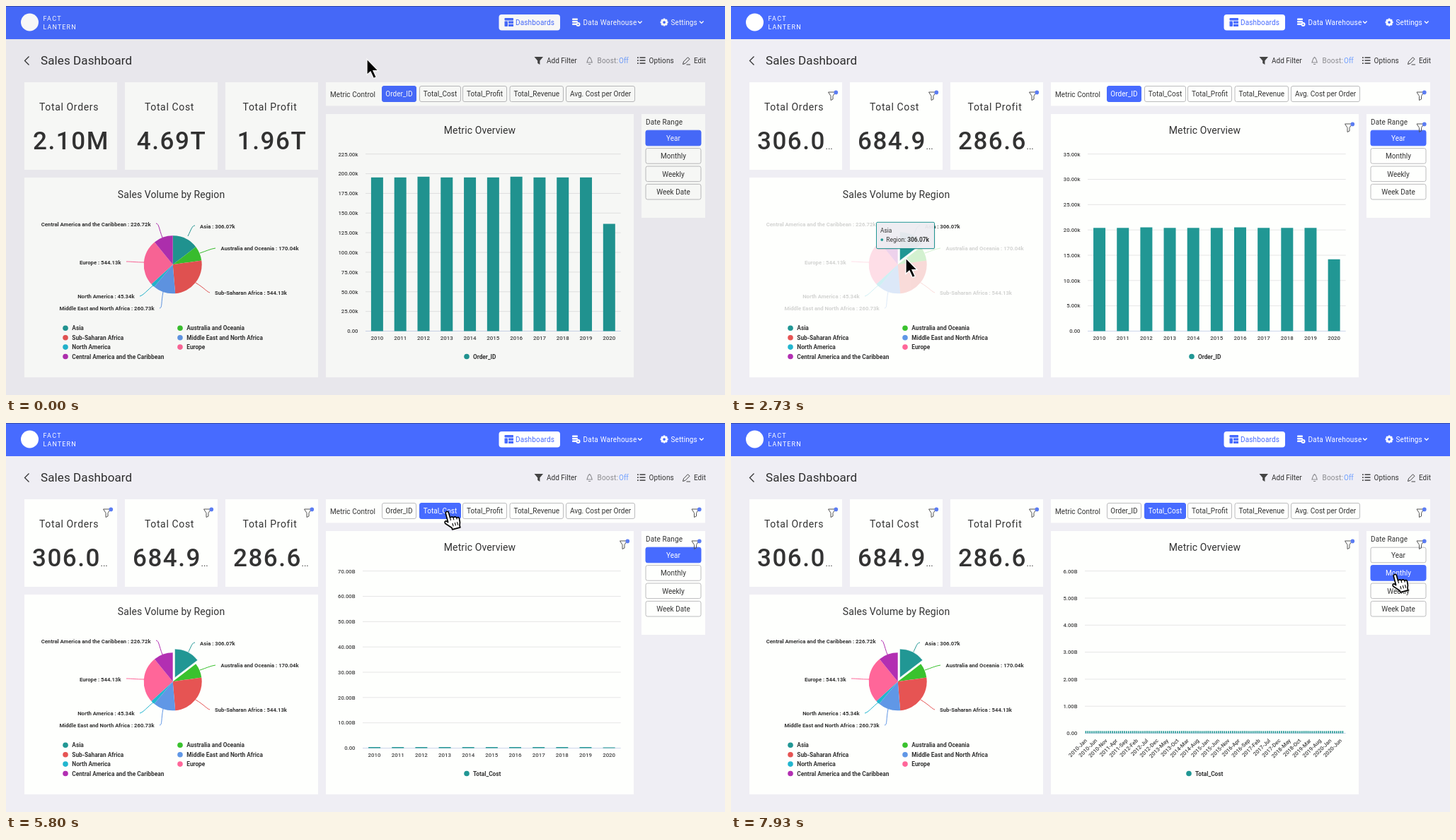
Recreate the animation shown at these times as an HTML page. Size 1016x551 px, loop 8 s.

```html
<!DOCTYPE html>
<html lang="en">
<head>
<meta charset="utf-8">
<title>Sales Dashboard</title>
<style>
html, body { margin: 0; width: 100%; height: 100%; overflow: hidden; background: #efeef4; }
svg { display: block; width: 1016px; height: 551px; font-family: Roboto, sans-serif; }
text { white-space: pre; }
</style>
</head>
<body>
<svg viewBox="0 0 1016 551"><g id="page"></g><g id="live"></g></svg>
<script>
const LOOP = 8000, FPS = 15;
const BLUE = '#476bff', TEAL = '#219794', INK = '#333', CARD = '#fefffd';

// Drawing helpers
const rect = (x, y, w, h, fill, more = '') =>
  `<rect x="${x}" y="${y}" width="${w}" height="${h}" fill="${fill}" ${more}/>`;
const dot = (x, y, r, fill) => `<circle cx="${x}" cy="${y}" r="${r}" fill="${fill}"/>`;
const line = (d, stroke, width = 1, more = '') =>
  `<path d="${d}" fill="none" stroke="${stroke}" stroke-width="${width}" ${more}/>`;
const shape = (d, fill, more = '') => `<path d="${d}" fill="${fill}" ${more}/>`;
const text = (s, x, y, size, fill = INK, more = '') =>
  `<text x="${x}" y="${y}" font-size="${size}" fill="${fill}" ${more}>${s}</text>`;
const group = (attrs, body) => `<g ${attrs}>${body}</g>`;
const MID = 'text-anchor="middle"', END = 'text-anchor="end"', BOLD = 'font-weight="700"';
const spaced = n => `letter-spacing="${n}"`;

// Timing helpers
const ramp = (t, a, b) => Math.min(1, Math.max(0, (t - a) / (b - a)));
const sine = p => (1 - Math.cos(Math.PI * p)) / 2;
const during = (t, a, b) => t >= a && t < b;

const KPIS = [
  ['Total Orders', '2.10M', '306.0'],
  ['Total Cost', '4.69T', '684.9'],
  ['Total Profit', '1.96T', '286.6'],
].map(([title, all, asia], i) => ({ title, all, asia, x: 26 + 142 * i }));

const METRICS = [['Order_ID', 531, 49], ['Total_Cost', 584, 59], ['Total_Profit', 645, 63],
  ['Total_Revenue', 711.5, 76.5], ['Avg. Cost per Order', 791, 98]];
const RANGES = ['Year', 'Monthly', 'Weekly', 'Week Date'];

// name, value, colour, label x, label y, anchored at end, connector
const REGIONS = [
  ['Asia', 306.07, TEAL, 274, 312, 0, 'M267,311C263,311 262,316 257,326'],
  ['Australia and Oceania', 170.04, '#3ac22e', 303.5, 343, 0, 'M296,343C289,344 283,347 274,350'],
  ['Sub-Saharan Africa', 544.13, '#e65453', 295, 406, 0, 'M288,406C284,405 281,400 268,392'],
  ['Middle East and North Africa', 260.73, '#6097e6', 209.5, 428, 1, 'M217,428C221,428 219,420 222,405'],
  ['North America', 45.34, '#22b6cf', 181.5, 411.5, 1, 'M189,411C194,410 200,402 209,395'],
  ['Europe', 544.13, '#ff6699', 162.5, 363, 1, 'M170,362C177,362 184,363 195,363'],
  ['Central America and the Caribbean', 226.72, '#b22fb2', 204.5, 309, 1, 'M212,308C216,308 216,315 221,328'],
];
const LEGEND_ORDER = [0, 1, 2, 3, 4, 5, null, null];

const yearly = (typical, high, last) =>
  Array.from({ length: 11 }, (_, i) => i === 10 ? last : i === 2 || i === 6 ? high : typical);
const cost = yearly(64, 64.1, 44.8);
cost[7] = 63.8;
cost[9] = 63.5;
const CHARTS = [
  { from: 0, x: 508, step: 25, rows: 9, unit: 'k', data: yearly(195.3, 196.2, 136.3), grow: [-2, -1], name: 'Order_ID' },
  { from: 2130, x: 504, step: 5, rows: 7, unit: 'k', data: yearly(28.6, 28.75, 19.9), grow: [2157, 3057], name: 'Order_ID' },
  { from: 5730, x: 504, step: 10, rows: 7, unit: 'B', data: cost, grow: [5757, 6607], name: 'Total_Cost' },
  { from: 7800, x: 500, step: 1, rows: 6, unit: 'B', monthly: true, grow: [7865, 8715], name: 'Total_Cost',
    data: Array.from({ length: 127 }, (_, i) => 5.3 + 0.15 * Math.cos(i * Math.PI / 3)) },
];
const MONTHS = 'Jan Feb Mar Apr May Jun Jul Aug Sep Oct Nov Dec'.split(' ');

const CURSOR_KEYS = [[533, 510, 75], [1267, 247, 357], [3733, 247, 357], [4400, 636, 173], [4800, 636, 173],
  [5000, 611, 150], [5267, 627, 126], [6333, 627, 126], [6600, 940, 238], [6733, 940, 238],
  [7000, 932, 228], [7267, 942, 215]];

function topBar() {
  const caret = x => line(`M${x},21.5l2.8,2.8l2.8,-2.8`, '#fff', 1.3);
  const gear = Array.from({ length: 4 }, (_, i) =>
    rect(928.6, 17.6, 3, 11, '#fff', `rx=".8" transform="rotate(${45 * i} 930.1 23.1)"`)).join('');
  return rect(0, 0, 1016, 47, BLUE) + rect(0, 0, 1016, 1, '#324ab0')
    + dot(33.5, 23, 12.5, '#fff')
    + text('FACT', 52.5, 21, 9, '#fff', spaced(1.3)) + text('LANTERN', 52.5, 33, 9, '#fff', spaced(1.1))
    + rect(696.5, 12, 86.5, 22.5, '#fff', 'rx="4"')
    + rect(704.5, 17, 12.5, 3.5, BLUE, 'rx=".8"') + rect(704.5, 21.5, 4.5, 7.5, BLUE, 'rx=".8"')
    + rect(710, 21.5, 7, 3.2, BLUE) + rect(710, 25.7, 7, 3.3, BLUE)
    + text('Dashboards', 720, 27, 10, BLUE, spaced(0.15))
    + [17.5, 21, 24.5].map(y => rect(800, y, 8, 2.5, '#fff', 'rx="1"')).join('')
    + dot(808.5, 26, 3, '#fff') + dot(808.5, 26, 1, BLUE)
    + text('Data Warehouse', 815.5, 27, 10, '#fff', spaced(0.2)) + caret(893)
    + gear + dot(930.1, 23.1, 4.2, '#fff') + dot(930.1, 23.1, 1.9, BLUE)
    + text('Settings', 939.5, 27, 10, '#fff', spaced(0.1)) + caret(980);
}

function toolBar() {
  return line('M32.5,71.5L26.5,77.5L32.5,83.5', INK, 1.3)
    + text('Sales Dashboard', 49, 83, 17, '#2d2d2d', spaced(0.1))
    + shape('M746.5,72H759L754.4,77.5V83L751.2,81V77.5Z', '#444')
    + text('Add Filter', 764, 81, 10)
    + line('M824.6,72.5C821,75 822,78 821,80H828.2C827.2,78 828.2,75 824.6,72.5ZM823,82.5H826.2', '#8a8a8e', 1.1)
    + text('Boost:', 835.5, 81, 10, '#8a8a8e', spaced(0.2)) + text('Off', 866, 81, 10, '#6f9fff')
    + [73, 77, 81].map(y => rect(892, y - 0.6, 1.8, 1.5, INK) + rect(895.5, y - 0.6, 8, 1.4, INK)).join('')
    + text('Options', 908.5, 81, 10, INK, spaced(0.1))
    + line('M956.5,82.5L957.5,78.8L963.5,72.7L966,75.2L960,81.3ZM961.5,83H967', '#444', 1)
    + text('Edit', 972, 81, 10);
}

function cards() {
  const card = (x, y, w, h) => rect(x, y, w, h, CARD);
  const legend = REGIONS.map(([name, , color], i) => {
    const row = i === 6 ? 3 : i >> 1, x = i % 2 && i < 6 ? 246 : 84, y = 456.3 + 13.4 * row;
    return dot(x, y, 3.8, color) + text(name, x + 9.3, y + 3, 8.3, INK, BOLD);
  }).join('');
  return KPIS.map(k => card(k.x, 108, 131, 124)
      + text(k.title, k.x + 63, 147.5, 14, INK, MID + spaced(0.65))).join('')
    + card(26, 243, 415, 283) + card(452, 108, 536, 33.5) + card(452, 153, 435, 373) + card(898, 153, 90, 147)
    + text('Sales Volume by Region', 233.5, 271.5, 14, INK, MID + spaced(0.1))
    + text('Metric Overview', 669.5, 181.3, 14, INK, MID + spaced(0.1))
    + text('Metric Control', 458, 128.5, 10, INK, spaced(0.05))
    + text('Date Range', 904, 168, 10, INK, spaced(0.1))
    + legend;
}

function button(label, x, y, w, h, on) {
  return rect(x + 0.5, y + 0.5, w - 1, h - 1, on ? BLUE : CARD, `rx="2.5" stroke="${on ? BLUE : '#bcbcbe'}"`)
    + text(label, x + w / 2, y + h / 2 + 3.7, 10, on ? '#fff' : INK, MID);
}

function buttons(t) {
  const metric = t < 5590 ? 0 : 1, range = t < 7660 ? 0 : 1;
  return METRICS.map(([s, x, w], i) => button(s, x, 113, w, 23, i === metric)).join('')
    + RANGES.map((s, i) => button(s, 903.5, 175.7 + 25.4 * i, 79, 22.6, i === range)).join('');
}

function kpis(t) {
  const filtered = t >= 2060;
  const numbers = KPIS.map(k => filtered
    ? text(k.asia, k.x + 11, 203, 35, INK, 'font-weight="500"' + spaced(1.5)) + text('...', k.x + 107.5, 203, 13)
    : text(k.all, k.x + 66, 203, 35, INK, MID + 'font-weight="500"' + spaced(1.6))).join('');
  const funnel = ([x, y]) => group(`transform="translate(${x},${y})"`,
    line('M-5.5,-5H4.5L1,.5V5L-2,6.5V.5Z', '#555', 1, 'stroke-linejoin="round"') + dot(5.3, -4.6, 2.8, '#5b7cf2'));
  const spots = [[143, 127], [285, 127], [427, 127], [974.5, 127], [873, 172], [974.5, 172]];
  return numbers + (filtered ? spots.map(funnel).join('') : '');
}

function pie(t) {
  const cx = 235.7, cy = 366.3, r = 41;
  const total = REGIONS.reduce((sum, g) => sum + g[1], 0);
  const faded = ramp(t, 1130, 1300) - ramp(t, 4060, 4260);
  const active = t < 3930 ? 0 : 1;
  const pull = 6 * sine(ramp(t, 1690, 1960));
  let angle = 0;
  return REGIONS.map(([name, value, color, lx, ly, atEnd, wire], i) => {
    const a = angle, b = angle += 2 * Math.PI * value / total;
    const shift = i ? 0 : pull, mid = (a + b) / 2;
    const x = cx + shift * Math.sin(mid), y = cy - shift * Math.cos(mid);
    const at = q => `${x + r * Math.sin(q)},${y - r * Math.cos(q)}`;
    const edge = shift ? 'stroke="#fff" stroke-width=".7"' : '';
    return group(`opacity="${i === active ? 1 : 1 - 0.79 * faded}"`,
      line(wire, color, 1)
      + shape(`M${x},${y}L${at(a)}A${r},${r} 0 0 1 ${at(b)}Z`, color, edge)
      + text(`${name} : ${value.toFixed(2)}k`, lx, ly + 2.7, 7.7, INK, BOLD + (atEnd ? END : '')));
  }).join('');
}

function tooltip(t) {
  if (!during(t, 1130, 4600)) return '';
  const i = t < 3930 ? 0 : 1;
  const [name, value, color] = REGIONS[i];
  const [x, y, w] = i ? [226, 310, 95] : [205.5, 306.3, 82];
  return group(`opacity="${1 - ramp(t, 4470, 4600)}"`,
    rect(x + 1, y + 1.2, w, 37.3, '#000', 'opacity=".12" rx="2"')
    + rect(x, y, w, 37.3, '#f0eff4', `fill-opacity=".94" stroke="${color}" rx="1.5"`)
    + text(name, x + 5.5, y + 14.6, 8.4)
    + dot(x + 7.8, y + 24.8, 1.9, color)
    + text(`Region: <tspan font-weight="700">${value}k</tspan>`, x + 13.8, y + 27.6, 8.4));
}

function chart(t) {
  const c = CHARTS.filter(item => t >= item.from).pop();
  const top = 209.7, base = c.monthly ? 439.5 : 460.5, right = 868.7;
  const rowGap = (base - top) / c.rows, slot = (right - c.x) / (c.monthly ? 128 : 11);
  const grown = sine(ramp(t, ...c.grow)), barWidth = c.monthly ? 1.7 : 17;
  let out = '';
  for (let i = 0; i <= c.rows; i++) {
    const y = base - i * rowGap, v = (i * c.step).toFixed(2) + (i ? c.unit : '');
    out += line(`M${c.x},${y}H${right}`, i ? '#e6e6e6' : '#ccd6eb')
      + text(v, c.x - 10.5, y + 2.8, 7.7, '#444', END + 'font-weight="500"');
  }
  c.data.forEach((v, i) => {
    const x = c.x + slot * (i + 0.5), h = Math.max(1, v / c.step * rowGap * grown);
    out += rect(x - barWidth / 2, base - h, barWidth, h, TEAL);
    if (!c.monthly) out += text(2010 + i, x, 472.8, 7.9, '#444', MID + 'font-weight="500"');
    else if (i % 5 === 0) {
      const label = `${2010 + Math.floor(i / 12)}-${MONTHS[i % 12]}`;
      out += text(label, x + 2, 450.5, 7.7, '#444', END + `font-weight="500" transform="rotate(-45 ${x + 2} 450.5)"`);
    }
  });
  const lx = t < 5860 ? 651 : 647;
  return out + dot(lx, 496.5, 3.8, TEAL) + text(c.name, lx + 9, 499.5, 8.3, INK, BOLD);
}

function cursor(t) {
  let [, x, y] = CURSOR_KEYS[0];
  for (let i = 1; i < CURSOR_KEYS.length; i++) {
    const [t0, x0, y0] = CURSOR_KEYS[i - 1], [t1, x1, y1] = CURSOR_KEYS[i];
    if (t < t0) break;
    const p = sine(ramp(t, t0, t1));
    x = x0 + (x1 - x0) * p;
    y = y0 + (y1 - y0) * p;
  }
  const hand = during(t, 1190, 2320) || during(t, 5130, 6390) || t >= 6860;
  if (!hand) {
    return group(`transform="translate(${x},${y})"`,
      shape('M0,0V22.5L5,18L9.4,27.5L13.2,25.8L9,16.6H16Z', '#000', 'stroke="#fff" stroke-width="1.3"'));
  }
  return group(`transform="translate(${x - 4},${y}) rotate(-15)"`,
    shape('M-2.2,1.8Q-2.2,-.5 0,-.5Q2.2,-.5 2.2,1.8V9Q6,7.5 6.6,10Q10.4,8.8 11,11.4Q14.5,10.6 14.5,13.5'
      + 'L14,19L12.5,23V26H1V23.5L-6.5,15Q-7,11.5 -4.5,12L-2.2,14.5Z',
      '#fff', 'stroke="#000" stroke-width="1.7" stroke-linejoin="round"')
    + line('M2.2,9V13M6.6,10V13.5M11,11.4V14M3.5,17.5V22M7,17.5V22M10.3,17.5V22', '#000', 1.1));
}

const live = document.getElementById('live');
document.getElementById('page').innerHTML = rect(0, 0, 1016, 551, '#efeef4') + topBar() + toolBar() + cards();

function render(t) {
  live.innerHTML = buttons(t) + kpis(t) + pie(t) + tooltip(t) + chart(t) + cursor(t)
    + (t < 60 ? rect(0, 0, 1016, 551, '#000', 'opacity=".033"') : '');
}

const start = performance.now();
let shown = -1;
function tick() {
  const t = (performance.now() - start) % LOOP;
  const step = Math.min(119, Math.floor((t + 7) * FPS / 1000));
  if (step !== shown) render((shown = step) * 1000 / FPS);
  requestAnimationFrame(tick);
}
tick();
</script>
</body>
</html>
```
